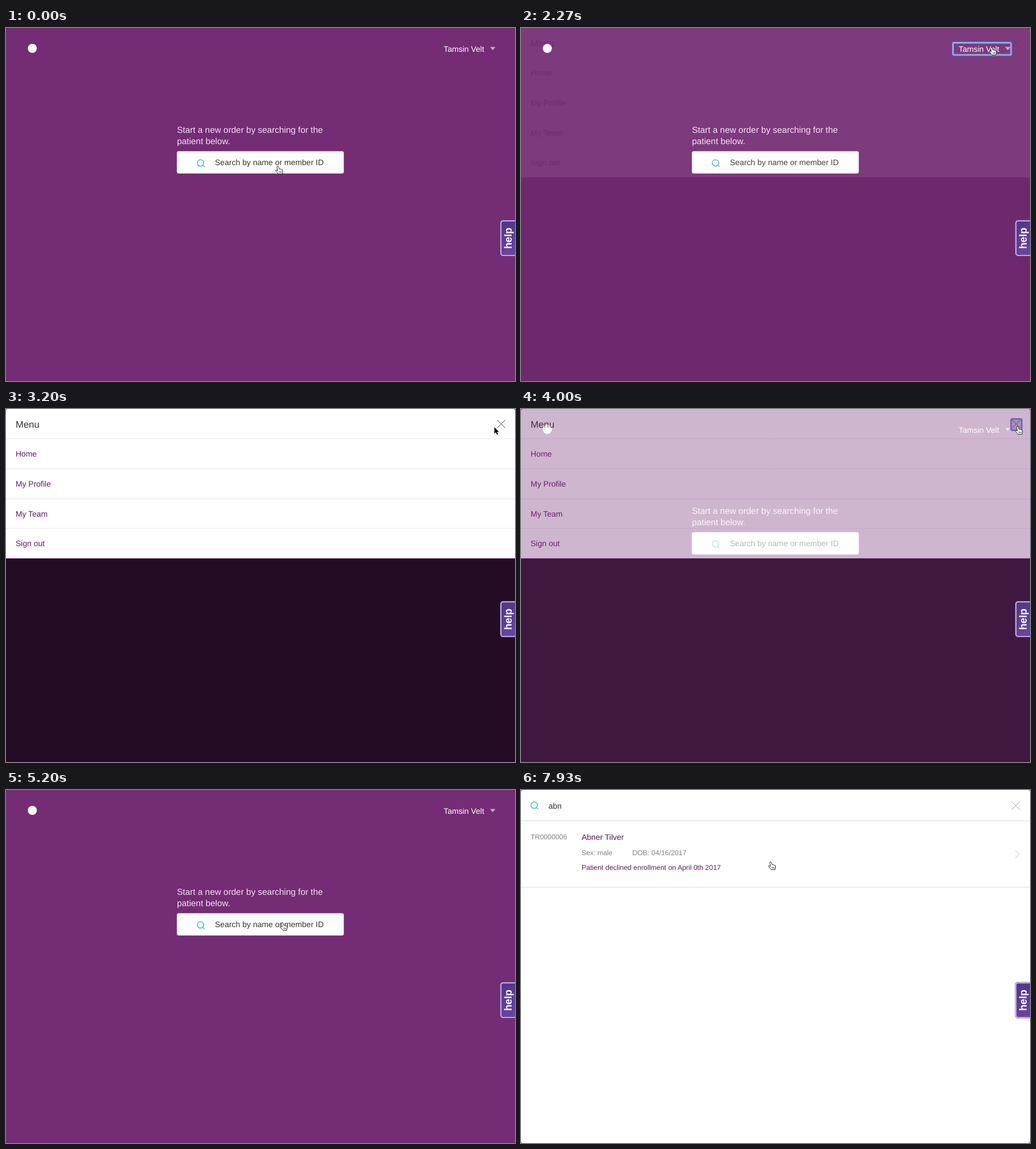
Write an HTML page with a canvas that moves like this. It is 899 by 623 pixels and loops after 8 s.

```html
<!DOCTYPE html>
<html lang="en">
<head>
<meta charset="utf-8">
<title>Patient search</title>
<style>
  html, body { margin: 0; width: 100%; height: 100%; overflow: hidden; background: #742c74; }
  canvas { display: block; }
</style>
</head>
<body>
<canvas id="stage" width="899" height="623"></canvas>
<script>
const W = 899, H = 623, LOOP = 8000;
const FONT = '"Liberation Sans", Arial, sans-serif';
const PLACEHOLDER = 'Search by name or member ID';
const PURPLE = '#742c74', TEAL = '#3ac6bd';

const stage = document.getElementById('stage').getContext('2d');
const layer = document.createElement('canvas');
layer.width = W;
layer.height = H;
const group = layer.getContext('2d');
stage.textRendering = group.textRendering = 'geometricPrecision';

const HAND = new Path2D('M-1.5 1.5Q-1.5 0 0 0Q1.3 0 1.6 1.4L2.5 5Q3.8 4 4.8 5.3Q6 4.6 6.8 6Q8.2 5.6 8.5 7.2Q9 10 7.8 13.6H1.2Q-.8 11.2-3.8 8.2Q-4.2 6.4-2.6 6.6L-.4 8Z');
const HAND_LINES = new Path2D('M2.4 8.8V11.6M4.4 8.8V11.6M6.3 8.8V11.6');
const ARROW = new Path2D('M0 0V11.6L2.7 9.1L4.5 13.3L6.4 12.5L4.6 8.5H8.1Z');

// Pointer stops: time, x, y
const STOPS = [
  [0, 480, 244], [300, 480, 244], [1250, 828, 42], [1650, 828, 42],
  [2150, 831, 34], [2700, 831, 34], [3500, 877, 31], [4350, 877, 31],
  [5150, 488, 234], [7250, 488, 234], [7800, 441, 127], [LOOP, 441, 127]
];

const clamp = v => Math.max(0, Math.min(1, v));
const smooth = p => p * p * (3 - 2 * p);

// Same curve as the CSS "ease" keyword
function ease(p) {
  if (p <= 0 || p >= 1) return clamp(p);
  const bez = (a, b, s) => 3 * a * s * (1 - s) ** 2 + 3 * b * s * s * (1 - s) + s ** 3;
  let lo = 0, hi = 1;
  for (let i = 0; i < 20; i++) {
    const mid = (lo + hi) / 2;
    if (bez(0.25, 0.25, mid) < p) lo = mid; else hi = mid;
  }
  return bez(0.1, 1, lo);
}

const fade = (t, start, length = 330) => ease((t - start) / length);

function text(c, str, x, y, size, color, weight = '') {
  c.font = `${weight} ${size}px ${FONT}`;
  c.fillStyle = color;
  c.fillText(str, x, y);
}

function line(c, points, color, width = 1) {
  c.beginPath();
  points.forEach(([x, y], i) => i ? c.lineTo(x, y) : c.moveTo(x, y));
  c.strokeStyle = color;
  c.lineWidth = width;
  c.stroke();
}

function box(c, x, y, w, h, r, fill) {
  c.beginPath();
  c.roundRect(x, y, w, h, r);
  c.fillStyle = fill;
  c.fill();
}

function ring(c, x, y, w, h, color, width) {
  c.beginPath();
  c.roundRect(x, y, w, h, 2);
  c.strokeStyle = color;
  c.lineWidth = width;
  c.stroke();
}

function cross(c, x, y, r, color) {
  line(c, [[x - r, y - r], [x + r, y + r]], color);
  line(c, [[x + r, y - r], [x - r, y + r]], color);
}

function magnifier(c, x, y) {
  c.beginPath();
  c.arc(x, y, 5.7, 0, Math.PI * 2);
  c.strokeStyle = TEAL;
  c.lineWidth = 1.5;
  c.stroke();
  line(c, [[x + 4.1, y + 4.1], [x + 7, y + 7]], TEAL, 1.5);
}

function home(c, t) {
  c.fillStyle = PURPLE;
  c.fillRect(0, 0, W, H);

  c.beginPath();
  c.arc(46.5, 36, 8, 0, Math.PI * 2);
  c.fillStyle = '#fff';
  c.fill();

  if (t > 2200 && t < 3900) {
    ring(c, 763, 26, 102.5, 21.5, 'rgba(110,175,245,.45)', 4);
    ring(c, 763, 26, 102.5, 21.5, '#7ab8f5', 2);
  }
  text(c, 'Tamsin Velt', 773, 41.5, 14, '#fff');
  c.beginPath();
  c.moveTo(855, 33.5);
  c.lineTo(864.5, 33.5);
  c.lineTo(859.7, 39.3);
  c.fillStyle = '#c8abc8';
  c.fill();

  const soft = 'rgba(255,255,255,.88)';
  text(c, 'Start a new order by searching for the', 302, 184.8, 15.4, soft, 300);
  text(c, 'patient below.', 302, 204.8, 15.4, soft, 300);
  box(c, 301.8, 217.6, 294.8, 39.1, 3, '#fff');
  magnifier(c, 343.6, 238.1);
  text(c, PLACEHOLDER, 369, 242.4, 14.05, '#333');
}

function menu(c, t) {
  c.clearRect(0, 0, W, H);
  c.fillStyle = 'rgba(0,0,0,.69)';
  c.fillRect(0, 0, W, H);
  c.clearRect(0, 0, W, 263.5);
  c.fillStyle = '#fff';
  c.fillRect(0, 0, W, 263.5);

  text(c, 'Menu', 17, 32.5, 16.8, '#333', 300);
  ['Home', 'My Profile', 'My Team', 'Sign out'].forEach((item, i) => {
    const y = Math.floor(52.7 * (i + 1)) + 0.5;
    line(c, [[0, y], [W, y]], '#ebe8eb');
    text(c, item, 17, 84.3 + 52.7 * i, 14, '#641a66');
  });

  const focused = t > 3900;
  if (focused) {
    box(c, 865, 17, 20, 21, 2, '#bcc6ee');
    ring(c, 865.5, 17.5, 19, 20, '#5c80d6', 2.4);
  }
  cross(c, 874.5, 26.5, 6.8, focused ? '#8e3548' : '#4a3a4a');
}

function search(c, t) {
  const typed = 'abn'.slice(0, Math.max(0, Math.floor((t - 6300) / 200)));
  c.clearRect(0, 0, W, H);
  c.fillStyle = '#fff';
  c.fillRect(0, 0, W, H);
  magnifier(c, 23.2, 26.8);
  text(c, typed || PLACEHOLDER, 48.5, 32.5, 14.05, typed ? '#333' : '#777');
  cross(c, 873.7, 27.5, 7, '#999');
  line(c, [[0, 54.5], [W, 54.5]], '#dcdcdc');

  if (t < 7100) return;
  text(c, 'TR0000006', 17, 86.5, 12.3, '#808080');
  text(c, 'Abner Tilver', 107, 88, 14, '#4f1c52');
  text(c, 'Sex: male', 107, 114.5, 12.3, '#808080');
  text(c, 'DOB: 04/16/2017', 196.5, 114.5, 12.4, '#808080');
  text(c, 'Patient declined enrollment on April 0th 2017', 107, 140.5, 12.4, '#57225a');
  line(c, [[873, 106.5], [880, 113.5], [873, 120.5]], '#c4c4c4');
  line(c, [[0, 171.5], [W, 171.5]], '#dcdcdc');
}

function blend(c, alpha, draw, t) {
  if (alpha <= 0) return;
  draw(group, t);
  c.globalAlpha = alpha;
  c.drawImage(layer, 0, 0);
  c.globalAlpha = 1;
}

function helpTab(c) {
  box(c, 872.5, 338.7, 40, 64.3, 5, 'rgba(112,92,165,.8)');
  box(c, 873.5, 339.7, 40, 62.3, 4.5, '#ddd3ea');
  const g = c.createLinearGradient(875, 341, 899, 401);
  g.addColorStop(0, '#50358c');
  g.addColorStop(1, '#6a45a4');
  box(c, 875, 341.2, 40, 59.5, 3, g);
  c.save();
  c.translate(893, 389.8);
  c.rotate(-Math.PI / 2);
  text(c, 'help', 0, 0, 18.3, '#fff', 'bold');
  c.restore();
}

function pointerAt(t) {
  const i = Math.max(1, STOPS.findIndex(s => s[0] > t));
  const [t0, x0, y0] = STOPS[i - 1], [t1, x1, y1] = STOPS[i];
  const p = smooth(clamp((t - t0) / (t1 - t0)));
  return [x0 + (x1 - x0) * p, y0 + (y1 - y0) * p];
}

function isHot(t, x, y) {
  const over = (l, top, r, b) => x >= l && x <= r && y >= top && y <= b;
  if (t >= 5500) return t > 7100 && over(0, 55, W, 172);
  if (t > 2450 && t < 4400) return over(864, 16, 886, 39);
  return over(302, 218, 596, 257) || over(762, 25, 867, 48);
}

function pointer(c, t) {
  const [x, y] = pointerAt(t);
  c.save();
  c.translate(x, y);
  c.lineJoin = 'round';
  if (isHot(t, x, y)) {
    c.fillStyle = '#fff';
    c.fill(HAND);
    c.strokeStyle = '#222';
    c.lineWidth = 1;
    c.stroke(HAND);
    c.lineWidth = 0.8;
    c.stroke(HAND_LINES);
  } else {
    c.strokeStyle = '#fff';
    c.lineWidth = 1.8;
    c.stroke(ARROW);
    c.fillStyle = '#000';
    c.fill(ARROW);
  }
  c.restore();
}

function corners(c) {
  c.beginPath();
  c.rect(0, 0, W, H);
  c.roundRect(0, 0, W, H, 3);
  c.fillStyle = '#3a3040';
  c.fill('evenodd');
}

function frame(now) {
  const t = now % LOOP;
  home(stage, t);
  blend(stage, fade(t, 2245) - fade(t, 3928), menu, t);
  blend(stage, fade(t, 5500), search, t);
  helpTab(stage);
  pointer(stage, t);
  corners(stage);
  requestAnimationFrame(() => frame(performance.now()));
}

frame(performance.now());
</script>
</body>
</html>
```
